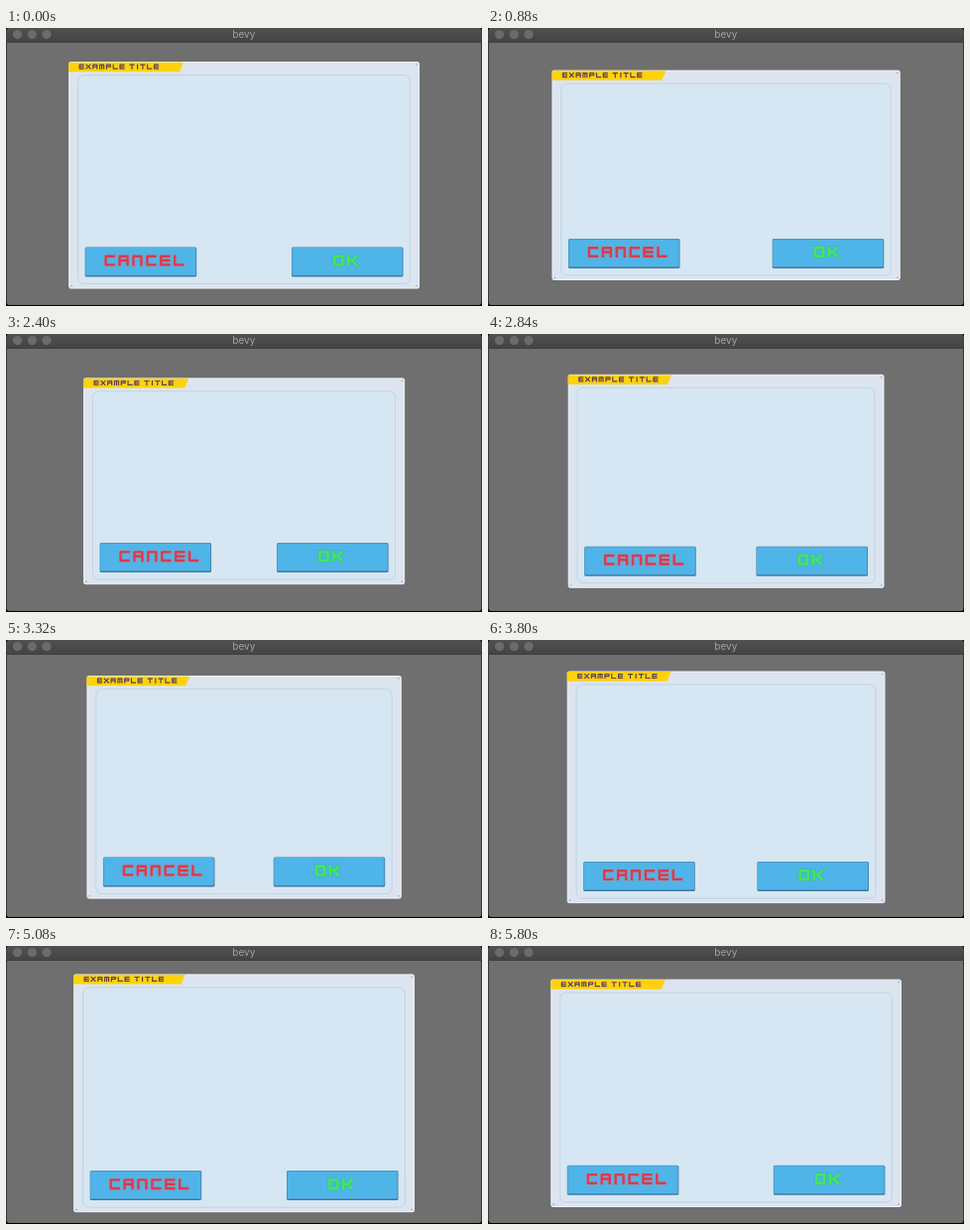
Write an HTML page that moves like this. It is 480 px wide and 281 px high and loops after 5840 ms.

```html
<!DOCTYPE html>
<html lang="en">
<head>
<meta charset="utf-8">
<title>bevy</title>
<style>
  html, body { margin: 0; width: 100%; height: 100%; overflow: hidden; background: #000; }
  svg { display: block; }
  .word path { fill: none; stroke-linejoin: round; stroke-linecap: square; }
</style>
</head>
<body>
<svg width="480" height="281" viewBox="0 0 480 281">
  <defs>
    <linearGradient id="bar" x1="0" y1="0" x2="0" y2="1">
      <stop offset="0" stop-color="#505050"/>
      <stop offset="1" stop-color="#444"/>
    </linearGradient>
  </defs>
  <rect x="0.5" width="479" height="280" rx="3" fill="#6f6f6f"/>
  <path d="M.5 14V3a3 3 0 0 1 3-3H476.500a3 3 0 0 1 3 3V14Z" fill="url(#bar)"/>
  <rect x="0.5" y="14" width="479" height="0.8" fill="#353535"/>
  <g fill="#6b6b6b">
    <circle cx="11.500" cy="6.600" r="4.600"/>
    <circle cx="26.300" cy="6.600" r="4.600"/>
    <circle cx="41" cy="6.600" r="4.600"/>
  </g>
  <text x="239.800" y="10.300" text-anchor="middle" font-family="Inter, Roboto, sans-serif" font-size="10" fill="#a3a3a3">bevy</text>
  <g id="panel">
    <rect id="frame" rx="1.500" fill="#dce5ef" stroke="#eff3f8" stroke-width="1"/>
    <rect id="inner" rx="6" fill="#d6e6f2" stroke="#bfd2de" stroke-width="0.9"/>
    <g id="rivets" fill="#9aa9b5"></g>
    <path id="tab" fill="#ffd20a"/>
    <g id="title"></g>
    <g id="cancel"></g>
    <g id="ok"></g>
  </g>
</svg>
<script>
const LOOP = 5840, STEP = 40;
const CENTER = { x: 240.1, y: 148.8 };
const BUTTON = { w: 112.5, h: 30 };
const NS = 'http://www.w3.org/2000/svg';
const $ = id => document.getElementById(id);

// Strokes run over a 3 x 3 grid: 1 is top left, 9 is bottom right.
const GLYPHS = {
  A: '7139 46', C: '3179', E: '3179 46', I: '28', K: '17 45 53 59', L: '179',
  M: '7139 28', N: '7139', O: '13971', P: '71364', T: '13 28', X: '19 37'
};

function set(node, attrs) {
  for (const key in attrs) node.setAttribute(key, attrs[key]);
  return node;
}

function add(parent, tag, attrs) {
  return parent.appendChild(set(document.createElementNS(NS, tag), attrs));
}

function lettering(word, w, h, pitch, space) {
  let x = 0, d = '';
  for (const ch of word) {
    if (ch === ' ') { x += space; continue; }
    const narrow = ch === 'I';
    const left = narrow ? x - w * 0.3 : x;
    for (const stroke of GLYPHS[ch].split(' ')) {
      d += 'M' + [...stroke].map(n => {
        const col = (n - 1) % 3, row = Math.floor((n - 1) / 3);
        return `${(left + col * w / 2).toFixed(2)} ${(row * h / 2).toFixed(2)}`;
      }).join('L');
    }
    x += narrow ? pitch * 0.6 : pitch;
  }
  return d;
}

function addWord(parent, word, d, x, y, color, weight, halo) {
  const g = add(parent, 'g', { class: 'word', role: 'img', transform: `translate(${x} ${y})` });
  add(g, 'title', {}).textContent = word;
  if (halo) add(g, 'path', { d, stroke: halo, 'stroke-width': weight + 2, opacity: 0.4 });
  add(g, 'path', { d, stroke: color, 'stroke-width': weight });
}

function addButton(parent, word, textX, color, halo) {
  const { w, h } = BUTTON;
  add(parent, 'rect', { width: w, height: h, rx: 1.5, fill: '#4679a0' });
  add(parent, 'rect', { x: 0.5, y: 0.5, width: w - 1.3, height: h - 2, rx: 1.2, fill: '#4fb4e8' });
  addWord(parent, word, lettering(word, 8, 8.6, 13.9, 6), textX, 9.3, color, 2.4, halo);
}

addWord($('title'), 'EXAMPLE TITLE', lettering('EXAMPLE TITLE', 4, 3.9, 6.8, 3.2), 0, 0, '#5b3f5c', 1.2);
addButton($('cancel'), 'CANCEL', 21, '#dc3a4c', '#b08a9c');
addButton($('ok'), 'OK', 43.3, '#3fea55', '#3fb58e');
const rivets = Array.from({ length: 3 }, () => add($('rivets'), 'circle', { r: 0.8 }));

const swing = (t, peak) => Math.cos(2 * Math.PI * (t - peak) / LOOP);
const move = (id, x, y) => set($(id), { transform: `translate(${x} ${y})` });

function draw(t) {
  const w = 336 + 18.8 * swing(t, 300);
  const h = 223.5 - 19 * swing(t, 1760);
  const x = CENTER.x - w / 2, y = CENTER.y - h / 2;
  const right = x + w, bottom = y + h;

  set($('frame'), { x: x + 0.5, y: y + 0.5, width: w - 1, height: h - 1 });
  set($('inner'), { x: x + 9.3, y: y + 13.5, width: w - 18.8, height: h - 18.5 });
  const tab = w * 0.327;
  set($('tab'), { d: `M${x} ${y + 0.6}h${tab}l-4 9.6H${x}Z` });
  [[right - 2.8, y + 2.8], [x + 2.8, bottom - 2.8], [right - 2.8, bottom - 2.8]]
    .forEach(([cx, cy], i) => set(rivets[i], { cx, cy }));

  move('title', x + 11, y + 3.1);
  const buttonY = bottom - 12.1 - BUTTON.h;
  move('cancel', x + 16.5, buttonY);
  move('ok', right - 16.5 - BUTTON.w, buttonY);
}

function tick() {
  draw(Math.floor(performance.now() % LOOP / STEP) * STEP);
  requestAnimationFrame(tick);
}
tick();
</script>
</body>
</html>
```
